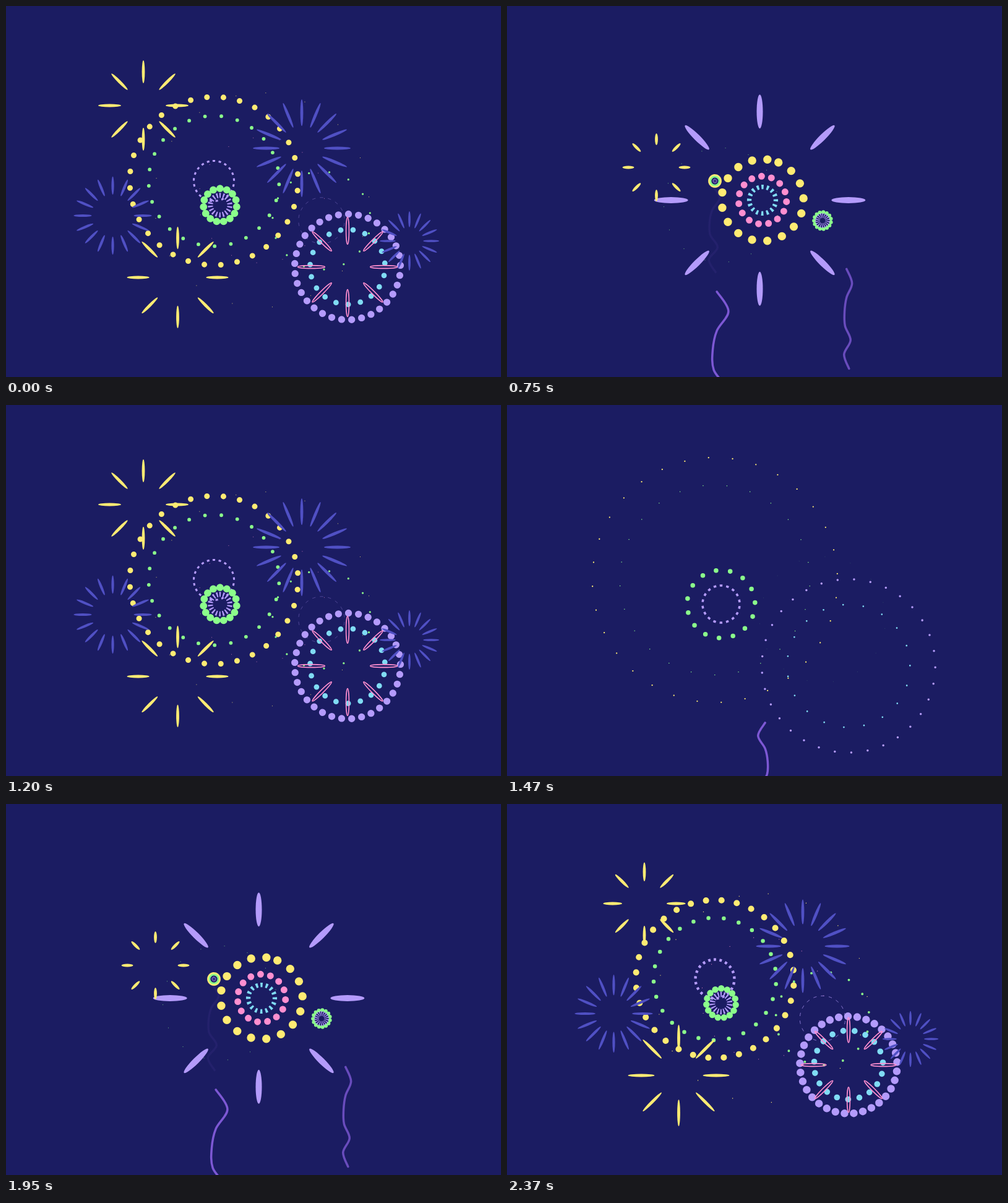
An HTML page that plays this animation: 800x600 px, repeating every 2400 ms.

```html
<!DOCTYPE html>
<html lang="en">
<head>
<meta charset="utf-8">
<title>Fireworks</title>
<style>
html, body { margin: 0; width: 100%; height: 100%; overflow: hidden; background: #1b1c62; }
svg { display: block; width: 100%; height: 100%; }
</style>
</head>
<body>
<svg id="sky" viewBox="0 0 800 600"></svg>
<script>
const PERIOD = 1200;
const YELLOW = '#ffeb73', GREEN = '#8bfd8b', PURPLE = '#b49bfb', PINK = '#ff8fd0',
      CYAN = '#80dcf4', BLUE = '#5050c4', TRAIL = '#7d58d4';
const sky = document.getElementById('sky');
const f = n => n.toFixed(2);

// Soft start, long slow-down: shared by everything that bursts outwards.
const ease = p => Math.sin(Math.PI / 2 * Math.min(1, p) ** 1.15);

// Wraps a drawing function of progress 0..1 into one of absolute time.
const life = (start, dur, draw) => t => {
  const p = (t - start) / dur;
  return p > 0 && p < 1 ? draw(p) : '';
};

// Circle of dots that grows, turns and thins out.
const dots = ({ x, y, start, dur }, { color, count, radius, size, angle, spin, step = 360 / count }) =>
  life(start, dur, p => {
    const e = ease(p), r = radius * e;
    const width = 2 * Math.min(.22 * r, size * (1 - p) ** 2.2);
    let d = '';
    for (let i = 0; i < count; i++) {
      const a = (angle + spin * e + i * step) * Math.PI / 180;
      d += `M${f(x + r * Math.sin(a))} ${f(y - r * Math.cos(a))}h0`;
    }
    return `<path d="${d}" fill="none" stroke="${color}" stroke-linecap="round" stroke-width="${f(width)}"/>`;
  });

// Dashed circle that grows while its stroke narrows.
const dashes = ({ x, y, start }, { color, count, radius, size, dur = 600 }) =>
  life(start, dur, p => {
    const r = radius * ease(p), step = 2 * Math.PI * r / count;
    const width = Math.min(.95 * r, size * (1 - p) ** 1.4);
    return `<circle cx="${x}" cy="${y}" r="${f(r)}" fill="none" stroke="${color}" stroke-width="${f(width)}" `
      + `stroke-dasharray="${f(step * .42)} ${f(step * .58)}" `
      + `transform="rotate(${f(-90 - 75.6 / count)} ${x} ${y})"/>`;
  });

function rays(x, y, count, inner, outer, width, attrs) {
  let out = '';
  for (let i = 0; i < count; i++) {
    out += `<ellipse cx="${x}" cy="${f(y - (inner + outer) / 2)}" rx="${f(width)}" ry="${f((outer - inner) / 2)}" `
      + `transform="rotate(${i * 360 / count} ${x} ${y})" ${attrs}/>`;
  }
  return out;
}

// Sparks shoot out first, then their inner ends catch up.
const sparks = (x, y, count, start, scale, attrs) => life(start, 315, p => {
  const inner = 36 + 46 * p ** 10, outer = 36 + 46 * ease(p * 1.31);
  const width = 2.4 * Math.sqrt(scale) * Math.min(1, p * 8);
  return rays(x, y, count, inner * scale, outer * scale, width, attrs);
});

const petals = (x, y, start) => life(start, 600, p => {
  const r = 264 * ease(p), half = Math.min(.35 * r, 58.5 * (1 - p) ** 1.4);
  const alpha = Math.min(1, 3 * (1 - p));
  return rays(x, y, 8, r - half, r + half, Math.min(5, half), `fill="${PURPLE}" opacity="${f(alpha)}"`);
});

// Wavy rocket trail: rises, shrinks and fades out.
const WAVE = [-4, 7, -4, -8, -7, 4, -9, 1];
const trail = (x, y, start, sway = 1, stretch = 1) => life(start, 380, p => {
  const len = 260 - 130 * p, height = len * stretch;
  const top = y + 77 + 506 * (1 - p) ** 3 - height / 2;
  const last = WAVE.length - 1;
  const pt = i => {
    const k = Math.max(0, Math.min(last, i));
    return [x + WAVE[k] * sway * len / 130, top + height * k / last];
  };
  let d = 'M' + pt(0).map(f);
  for (let i = 0; i < last; i++) {
    const [a, b, c, e] = [pt(i - 1), pt(i), pt(i + 1), pt(i + 2)];
    const out = b.map((v, k) => f(v + (c[k] - a[k]) / 6));
    const back = c.map((v, k) => f(v - (e[k] - b[k]) / 6));
    d += `C${out} ${back} ${c.map(f)}`;
  }
  const alpha = Math.min(1, 14 * (1 - p) ** 2);
  return `<path d="${d}" fill="none" stroke="${TRAIL}" stroke-width="3.5" stroke-linecap="round" opacity="${f(alpha)}"/>`;
});

const big = { x: 336, y: 283, start: 706, dur: 1075 };
const middle = { x: 413, y: 314, start: 500, dur: 900 };
const low = { x: 552, y: 422, start: 805, dur: 1050 };
const right = { x: 510, y: 347, start: 640, dur: 940 };
const slow = { x: 346, y: 322, start: 910, dur: 1330 };
const yellow = `fill="${YELLOW}"`, blue = `fill="${BLUE}"`;

const parts = [
  trail(middle.x, middle.y, 167, -.6, .65),
  trail(big.x, big.y, 400),
  trail(slow.x, slow.y, 636),
  trail(right.x, right.y, 334),
  trail(low.x, low.y, 461, .65),
  petals(408.5, 314, middle.start),

  dots(big, { color: YELLOW, count: 32, radius: 227, size: 17.5, angle: .5, spin: 47.6 }),
  dots(big, { color: GREEN, count: 25, radius: 176, size: 11.2, angle: 36.5, spin: -50 }),
  dashes(big, { color: PURPLE, count: 21, radius: 34.2, size: 35 }),

  dots(middle, { color: YELLOW, count: 17, step: 21.5, radius: 188, size: 13.7, angle: 35.5, spin: -36 }),
  dots(middle, { color: PINK, count: 15, radius: 110, size: 11.2, angle: -14, spin: 33 }),
  dashes(middle, { color: CYAN, count: 16, radius: 39.5, size: 15.5 }),

  dots(low, { color: PURPLE, count: 33, radius: 175, size: 16, angle: -20.2, spin: 43.4 }),
  dots(low, { color: CYAN, count: 19, radius: 124, size: 12.4, angle: 29.6, spin: -43.3 }),

  dots(right, { color: GREEN, count: 15, radius: 104, size: 12, angle: 33.5, spin: -32 }),
  dashes(right, { color: PURPLE, count: 18, radius: 37.5, size: 14 }),

  dots(slow, { color: GREEN, count: 15, radius: 100, size: 12.5, angle: 7.7, spin: -29.5 }),
  dashes(slow, { color: PURPLE, count: 18, radius: 38, size: 14, dur: 900 }),

  sparks(172.5, 339, 16, 935, .77, blue),
  sparks(478, 230, 16, 993, .98, blue),
  sparks(652, 380, 16, 1010, .61, blue),
  sparks(222, 161, 8, 1047, 1, yellow),
  sparks(277.5, 439, 8, 930, 1, yellow),
  sparks(542, 183, 8, 815, 1, yellow),
  sparks(241.5, 261, 8, 673, 1, yellow),
  sparks(low.x, low.y, 8, 995, 1, `fill="none" stroke="${PINK}" stroke-width="1.6"`)
];

function render(now) {
  const t = now % PERIOD;
  sky.innerHTML = parts.map(part => part(t) + part(t + PERIOD)).join('');
}

let origin = null;
function tick(now) {
  if (origin === null) origin = now;
  render(now - origin);
  requestAnimationFrame(tick);
}
render(0);
requestAnimationFrame(tick);
</script>
</body>
</html>
```
